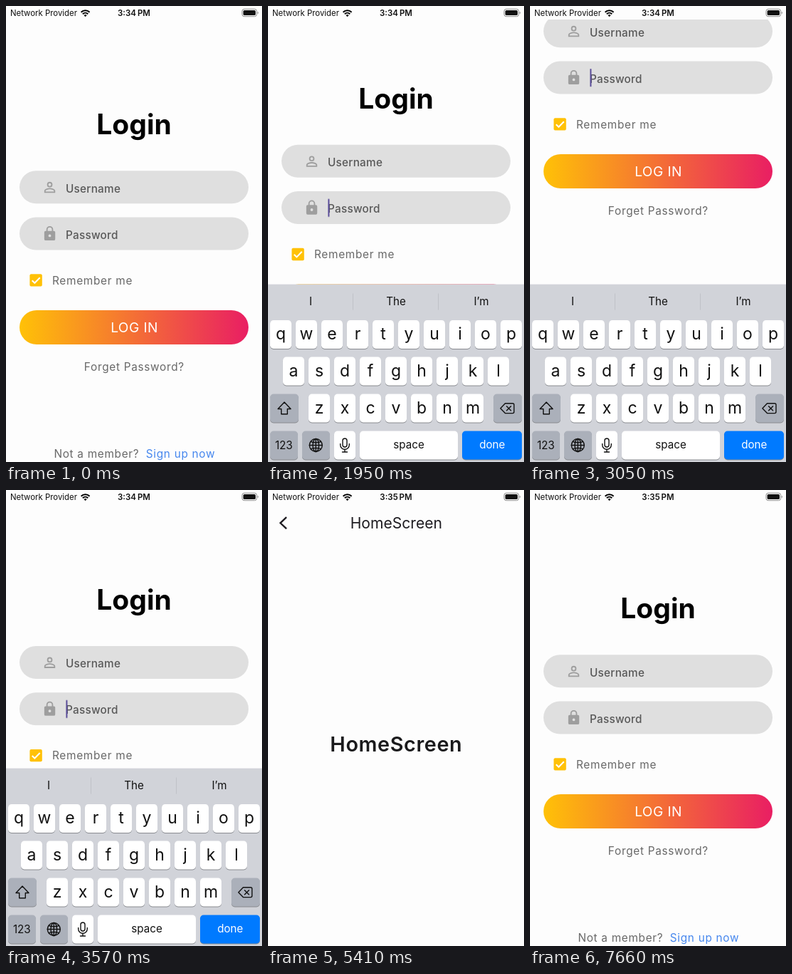
Recreate the animation shown at these times as an HTML page. Size 360 by 640 pixels, loop 8 s.

```html
<!DOCTYPE html>
<html lang="en">
<head>
<meta charset="utf-8">
<title>Login</title>
<style>
  html, body { margin: 0; width: 100%; height: 100%; overflow: hidden; background: #fdfdfd; }
  svg { display: block; width: 360px; height: 640px; }
  text { font-family: Inter, "Noto Sans", sans-serif; white-space: pre; }
  .mid { text-anchor: middle; }
  .page { fill: #fdfdfd; }
  .field { fill: #dfdfdf; }
  .icon { fill: #9e9e9e; }
  .label { font-size: 15.3px; font-weight: 500; letter-spacing: .25px; fill: #585858; }
  .body { font-size: 15.36px; letter-spacing: .7px; fill: #686868; }
  .link { fill: #4687ee; }
  .cursor { fill: #5b4e9a; }
  .status { font-size: 11.4px; fill: #111; }
  .clock { font-size: 11.5px; font-weight: 600; }
  .letter { font-size: 23px; fill: #111; }
  .word { font-size: 15.2px; fill: #111; }
  .line { fill: none; stroke: #111; stroke-width: 1.4; stroke-linejoin: round; stroke-linecap: round; }

  /* The script sets the time of these paused animations. */
  .anim { animation: 8s linear paused both; }
  #login { animation-name: login; }
  #home { animation-name: home; }
  #form { animation-name: scroll; }
  #keyboard {
    --spring: linear(0, .264, .594, .801, .908, .96, .983, .993, .997, 1);
    animation-name: keyboard;
  }
  #userCursor { animation-name: userCursor; }
  #passCursor { animation-name: passCursor; }
  #before { animation-name: before; }
  #after { animation-name: after; }
  #userCursor, #passCursor, #before, #after { animation-timing-function: step-end; }

  @keyframes keyboard {
    0% { transform: translateY(251px); }
    8% { transform: translateY(251px); animation-timing-function: var(--spring); }
    14.19%, 50% { transform: none; }
    51.19% { transform: none; animation-timing-function: var(--spring); }
    57%, 100% { transform: translateY(251px); }
  }
  @keyframes scroll {
    0% { transform: translateY(0); }
    23.6% { transform: translateY(0); animation-timing-function: cubic-bezier(.3, .2, .5, .9); }
    28.5% { transform: translateY(-235.5px); animation-timing-function: ease-out; }
    31% { transform: translateY(-247px); animation-timing-function: ease-in; }
    38.125% { transform: translateY(-219px); animation-timing-function: cubic-bezier(.3, .3, .4, 1); }
    47%, 100% { transform: translateY(0); }
  }
  @keyframes login {
    0% { transform: none; }
    63% { transform: none; animation-timing-function: cubic-bezier(.35, .91, .33, .97); }
    67.5% { transform: translateX(-120px); }
    92.5% { transform: translateX(-120px); animation-timing-function: cubic-bezier(.35, .91, .33, .97); }
    95.6%, 100% { transform: none; }
  }
  @keyframes home {
    0% { transform: translateX(360px); }
    63% { transform: translateX(360px); animation-timing-function: cubic-bezier(.35, .91, .33, .97); }
    67.5% { transform: none; }
    92.5% { transform: none; animation-timing-function: cubic-bezier(.35, .91, .33, .97); }
    95.6%, 100% { transform: translateX(360px); }
  }
  @keyframes userCursor {
    0%, 15.5%, 100% { opacity: 0; }
    7% { opacity: 1; }
  }
  @keyframes passCursor {
    0%, 25.6%, 38.3%, 50.75%, 100% { opacity: 0; }
    18.75%, 32%, 44.5% { opacity: 1; }
  }
  @keyframes before { 0% { opacity: 1; } 55%, 100% { opacity: 0; } }
  @keyframes after { 0% { opacity: 0; } 55%, 100% { opacity: 1; } }
</style>
</head>
<body>
<svg viewBox="0 0 360 640">
  <defs>
    <linearGradient id="warm">
      <stop stop-color="#ffc107"/>
      <stop offset="1" stop-color="#e91e63"/>
    </linearGradient>
  </defs>

  <g id="login" class="anim">
    <rect class="page" width="360" height="640"/>
    <g id="form" class="anim">
      <text class="mid" x="180" y="180" font-size="39" font-weight="700">Login</text>

      <rect class="field" x="19" y="231.2" width="322" height="46" rx="23"/>
      <path class="icon" transform="translate(50 243) scale(.96)" d="M12 5.9a2.1 2.1 0 1 1 0 4.2 2.1 2.1 0 0 1 0-4.2m0 9c2.97 0 6.1 1.46 6.1 2.1v1.1H5.9V17c0-.64 3.13-2.1 6.1-2.1M12 4a4 4 0 1 0 0 8 4 4 0 0 0 0-8zm0 9c-2.67 0-8 1.34-8 4v3h16v-3c0-2.66-5.33-4-8-4z"/>
      <text class="label" x="84" y="261.5">Username</text>
      <rect id="userCursor" class="anim cursor" x="84.4" y="242" width="2" height="25"/>

      <rect class="field" x="19" y="296.4" width="322" height="46" rx="23"/>
      <path class="icon" transform="translate(50 308) scale(.96)" d="M18 8h-1V6A5 5 0 0 0 7 6v2H6a2 2 0 0 0-2 2v10a2 2 0 0 0 2 2h12a2 2 0 0 0 2-2V10a2 2 0 0 0-2-2zm-6 9a2 2 0 1 1 0-4 2 2 0 0 1 0 4zm3.1-9H8.9V6a3.1 3.1 0 0 1 6.2 0z"/>
      <text class="label" x="84" y="326.6">Password</text>
      <rect id="passCursor" class="anim cursor" x="84.4" y="307.2" width="2" height="25"/>

      <rect x="33.4" y="376.2" width="17.4" height="17.4" rx="2" fill="#ffc107"/>
      <path d="M36.7 385.2l3.6 3.6 7.4-7.6" fill="none" stroke="#fff" stroke-width="2"/>
      <text class="body" x="65" y="390.5">Remember me</text>

      <rect x="19" y="427" width="322" height="48" rx="24" fill="url(#warm)"/>
      <text class="mid" x="180.5" y="457.8" font-size="19.2" letter-spacing=".4" fill="#fff">LOG IN</text>
      <text class="body mid" x="180.4" y="511.5">Forget Password?</text>
      <text class="body mid" x="127.4" y="634.3">Not a member?</text>
      <text class="body link mid" x="245.5" y="634.3">Sign up now</text>
    </g>
    <g id="keyboard" class="anim"></g>
  </g>

  <g id="home" class="anim">
    <rect class="page" width="360" height="640"/>
    <path d="M26 38.2L17.4 46.3 26 54.4" fill="none" stroke="#1d1b20" stroke-width="2.3"/>
    <text class="mid" x="180.3" y="54" font-size="21.1" fill="#1d1b20">HomeScreen</text>
    <text class="mid" x="180.3" y="367" font-size="28.8" font-weight="600" letter-spacing=".6" fill="#1a1a1c">HomeScreen</text>
  </g>

  <g class="status">
    <rect class="page" width="360" height="19"/>
    <text x="6" y="14">Network Provider</text>
    <g fill="none" stroke="#000" stroke-width="2">
      <path d="M105.6 8.7a8.6 8.6 0 0 1 12 0M107.9 11.3a5.3 5.3 0 0 1 7.4 0"/>
    </g>
    <path d="M111.6 15.2l-2.1-2.2a3 3 0 0 1 4.2 0z"/>
    <text id="before" class="anim clock mid" x="180" y="14">3:34&#8201;PM</text>
    <text id="after" class="anim clock mid" x="180" y="14">3:35&#8201;PM</text>
    <rect x="332" y="4.3" width="20.6" height="10.4" rx="3" fill="none" stroke="#8c8c8c"/>
    <rect x="333.6" y="5.9" width="17.4" height="7.2" rx="1.7"/>
    <path d="M353.8 7.8a2 2 0 0 1 0 3.6z" fill="#8c8c8c"/>
  </g>
</svg>
<script>
  const GREY = "#abb0ba";

  function label(text, x, y, kind, fill = "#111") {
    return `<text class="mid ${kind}" x="${x}" y="${y}" style="fill:${fill}">${text}</text>`;
  }

  function key(x, y, width, fill = "#fff") {
    const box = (top, color) =>
      `<rect x="${x}" y="${top}" width="${width}" height="40" rx="4.8" fill="${color}"/>`;
    return box(y + 1, "#898b90") + box(y, fill);
  }

  function letterRow(letters, x, y) {
    return [...letters].map((c, i) =>
      key(x + 36 * i, y, 30) + label(c, x + 36 * i + 15, y + 27, "letter")).join("");
  }

  document.getElementById("keyboard").innerHTML = [
    '<rect y="390.6" width="360" height="252" fill="#d1d3d9"/>',
    '<path d="M119.5 403.5v23M239.5 403.5v23" stroke="#bfc1c7"/>',
    ...["I", "The", "I’m"].map((word, i) => label(word, 60 + 120 * i, 420, "word")),
    letterRow("qwertyuiop", 3, 441),
    letterRow("asdfghjkl", 21, 492.5),
    letterRow("zxcvbnm", 57, 544.5),
    key(3, 544.5, 40, GREY),
    key(317, 544.5, 40, GREY),
    key(3, 596.5, 39, GREY),
    key(48, 596.5, 39, GREY),
    key(93, 596.5, 30),
    key(129, 596.5, 138),
    key(273, 596.5, 84, "#007aff"),
    label("123", 22.3, 622, "word"),
    label("space", 198, 621, "word"),
    label("done", 315.3, 621, "word", "#fff"),
    '<g class="line">',
    '<path d="M23 556l9 9.5h-4.7v7.3h-8.6v-7.3H14z"/>',
    '<path d="M333.5 557.8h10.5a2 2 0 0 1 2 2v9.8a2 2 0 0 1-2 2h-10.5l-6.6-6.9zM335.6 561.7l6 6m0-6l-6 6"/>',
    '<circle cx="67.3" cy="616.5" r="9"/><ellipse cx="67.3" cy="616.5" rx="4.3" ry="9"/>',
    '<path d="M58.3 616.5h18M67.3 607.5v18M60 611.3q7.3 3 14.6 0M60 621.7q7.3-3 14.6 0"/>',
    '<rect x="105" y="607" width="6" height="12" rx="3"/>',
    '<path d="M101.7 614.5v1.5a6.3 6.3 0 0 0 12.6 0v-1.5M108 622.5v3.5m-3.5 0h7"/>',
    "</g>"
  ].join("");

  // The picture advances in bursts of 110 ms steps and holds between them.
  const LOOP = 8000, STEP = 110;
  const bursts = [
    [0, 0], [500, 1290], [1510, 1730], [1950, 2730], [2830, 3570],
    [3670, 4440], [4550, 4550], [5090, 5410], [7450, 7660]
  ];

  function snap(time) {
    const [start, end] = bursts.findLast(burst => burst[0] <= time);
    return time >= end ? end : start + STEP * Math.floor((time - start) / STEP);
  }

  const animations = document.getAnimations();
  const origin = performance.now();

  function draw() {
    const time = snap((performance.now() - origin) % LOOP);
    for (const animation of animations) animation.currentTime = time;
    requestAnimationFrame(draw);
  }
  draw();
</script>
</body>
</html>
```
